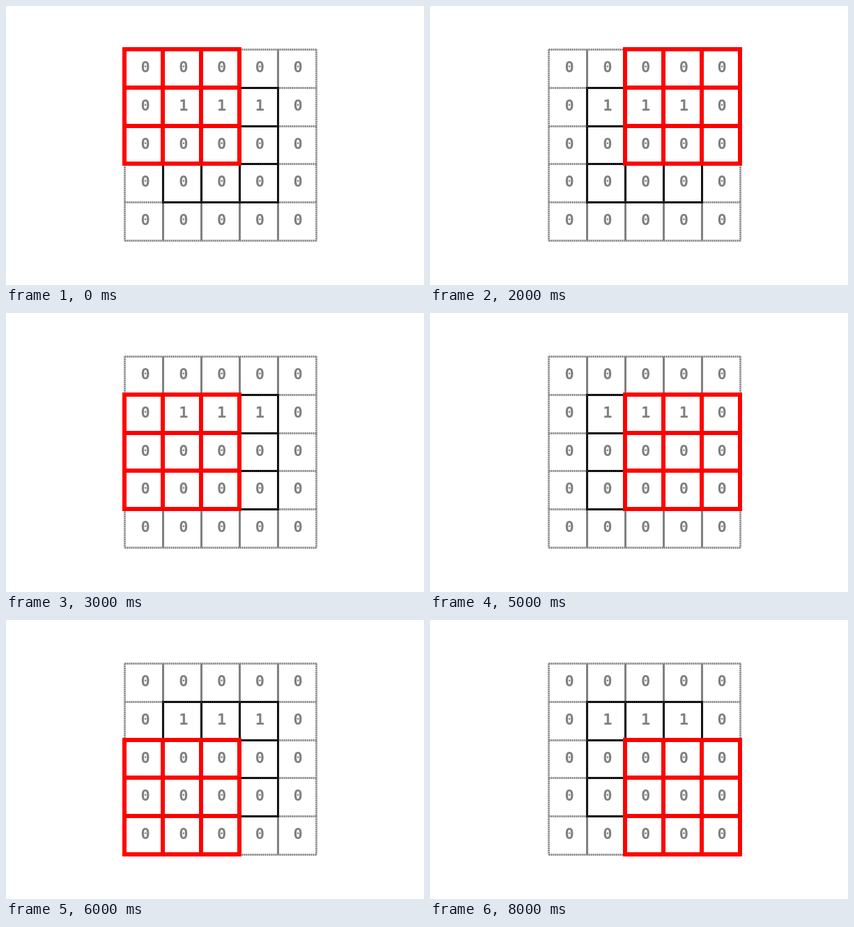
Write an HTML page that moves like this. It is 600 px wide and 400 px high and loops after 9000 ms.

```html
<!DOCTYPE html>
<html lang="en">
<head>
<meta charset="utf-8">
<title>Sliding window</title>
<style>
  html, body { margin: 0; width: 100%; height: 100%; overflow: hidden; background: #fff; }
  svg { display: block; width: 600px; height: 400px; }
  path { fill: none; }
  .dotted { stroke: #808080; stroke-width: 3; stroke-dasharray: 2 1; }
  .gray { stroke: #808080; stroke-width: 3; }
  .black { stroke: #000; stroke-width: 3; }
  .speckle { stroke: #808080; stroke-width: 1; stroke-dasharray: 1 2; }
  .window { stroke: #f00; stroke-width: 6; stroke-linecap: square; }
  text { font: bold 22px "DejaVu Sans Mono", monospace; fill: #808080; text-anchor: middle; }
</style>
</head>
<body>
<svg viewBox="0 0 600 400">
  <g id="grid"></g>
  <path id="window" class="window"/>
</svg>
<script>
const SIZE = 5, SPAN = 3, STEP_MS = 1000;
const grid = document.getElementById('grid');
const windowPath = document.getElementById('window');

const lineX = i => 170 + 55 * i;
const lineY = j => Math.round(62 + 54.8 * j);

function add(tag, attributes, content = '') {
  const node = document.createElementNS('http://www.w3.org/2000/svg', tag);
  for (const key in attributes) node.setAttribute(key, attributes[key]);
  node.textContent = content;
  grid.appendChild(node);
}

const across = (row, from, to, shift = 0) =>
  `M${lineX(from) + shift} ${lineY(row) + shift}H${lineX(to) + shift}`;
const down = (col, from, to, shift = 0) =>
  `M${lineX(col) + shift} ${lineY(from) + shift}V${lineY(to) + shift}`;

// All lines of a square block of cells
function lattice(col, row, count, shift) {
  let d = '';
  for (let i = 0; i <= count; i++) {
    d += across(row + i, col, col + count, shift) + down(col + i, row, row + count, shift);
  }
  return d;
}

function drawGrid() {
  for (let i = 0; i <= SIZE; i++) {
    const edge = i === 0 || i === SIZE;
    add('path', { class: 'dotted', d: across(i, 0, SIZE, 0.5) });
    add('path', { class: edge ? 'dotted' : 'gray', d: down(i, 0, SIZE, 0.5) });
  }
  const inner = lattice(1, 1, SPAN, 0.5);
  add('path', { class: 'black', 'stroke-linecap': 'square', d: inner });
  add('path', { class: 'speckle', d: inner });

  for (let row = 0; row < SIZE; row++) {
    for (let col = 0; col < SIZE; col++) {
      const filled = row === 1 && col >= 1 && col <= 3;
      add('text', { x: 200 + 54.8 * col, y: 95 + 54.8 * row }, filled ? '1' : '0');
    }
  }
}

function render(time) {
  const step = Math.floor(time / STEP_MS) % (SPAN * SPAN);
  windowPath.setAttribute('d', lattice(step % SPAN, Math.floor(step / SPAN), SPAN, 0));
}

function tick() {
  render(performance.now());
  requestAnimationFrame(tick);
}

drawGrid();
tick();
</script>
</body>
</html>
```
